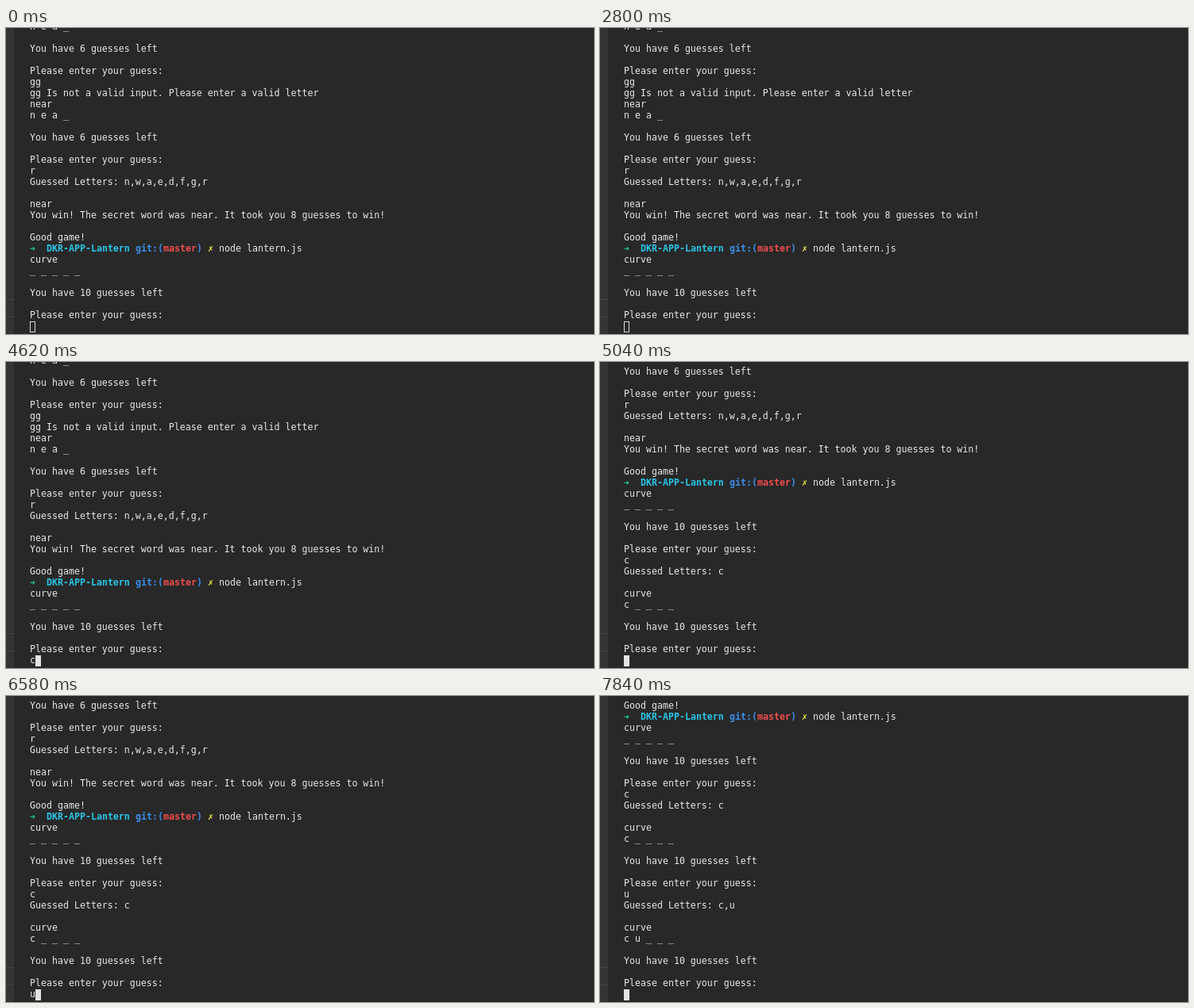
Animation of 740x386 px, one loop 8 s. Source, as an HTML page with a canvas:

```html
<!DOCTYPE html>
<html lang="en">
<head>
<meta charset="utf-8">
<title>Word guessing game in a terminal</title>
<style>
  html, body { margin: 0; width: 100%; height: 100%; overflow: hidden; background: #282828; }
  canvas { display: block; }
</style>
</head>
<body>
<canvas id="stage" width="740" height="386"></canvas>
<script>
const ctx = document.getElementById('stage').getContext('2d');

const LOOP = 8000;
const LEFT = 30, CELL = 7, LINE = 14, LAST_BASELINE = 380;
const FONT = '11.627px "DejaVu Sans Mono", monospace';
const TEXT = '#e8e8e8';

// Prompt pieces: column, text, colour, bold
const PROMPT = [
  [0, '➜', '#23d18b', true],
  [3, 'DKR-APP-Lantern', '#29c4e6', true],
  [19, 'git:(', '#3b8eea', true],
  [24, 'master', '#f14c4c', true],
  [30, ')', '#3b8eea', true],
  [32, '✗', '#f0f043', true],
  [34, 'node lantern.js', TEXT, false]
];

const ask = (left, word) => [word, '', `You have ${left} guesses left`, '', 'Please enter your guess:'];
const answer = (letter, guessed) => [letter, `Guessed Letters: ${guessed}`, '', 'curve'];

const start = [
  ...ask(6, 'n e a _'),
  'gg', 'gg Is not a valid input. Please enter a valid letter', 'near',
  ...ask(6, 'n e a _'),
  'r', 'Guessed Letters: n,w,a,e,d,f,g,r', '',
  'near', 'You win! The secret word was near. It took you 8 guesses to win!', '',
  'Good game!', PROMPT, 'curve',
  ...ask(10, '_ _ _ _ _')
];
const afterC = [...start, ...answer('c', 'c'), ...ask(10, 'c _ _ _ _')];
const afterU = [...afterC, ...answer('u', 'c,u'), ...ask(10, 'c u _ _ _')];

// Each step holds until the next one begins
const steps = [
  { at: 0, log: start, input: '' },
  { at: 3430, log: start, input: '', focus: true },
  { at: 4550, log: start, input: 'c', focus: true },
  { at: 5040, log: afterC, input: '', focus: true },
  { at: 6300, log: afterC, input: 'u', focus: true },
  { at: 6650, log: afterU, input: '', focus: true }
];

function write(text, column, baseline, color = TEXT, bold = false) {
  ctx.font = (bold ? 'bold ' : '') + FONT;
  ctx.fillStyle = color;
  ctx.fillText(text, LEFT + column * CELL, baseline);
}

function rect(x, y, w, h, color) {
  ctx.fillStyle = color;
  ctx.fillRect(x, y, w, h);
}

function drawWindow() {
  rect(0, 0, 740, 386, '#282828');
  rect(0, 0, 10, 386, '#343434');
  rect(0, 342, 10, 1, '#464646');
  rect(0, 364, 10, 1, '#464646');
}

function drawCursor(column, focus) {
  const x = LEFT + column * CELL;
  if (focus) {
    rect(x, 370, CELL, LINE, '#e4e4e4');
  } else {
    ctx.strokeStyle = '#d8d8d8';
    ctx.lineWidth = 1;
    ctx.strokeRect(x + 0.5, 370.5, CELL - 1, LINE - 1);
  }
}

function draw(time) {
  const { log, input, focus } = steps.findLast(step => step.at <= time);
  drawWindow();
  [...log, input].slice(-28).forEach((line, i) => {
    const baseline = LAST_BASELINE - (27 - i) * LINE;
    if (line === PROMPT) {
      for (const [column, text, color, bold] of PROMPT) write(text, column, baseline, color, bold);
    } else {
      write(line, 0, baseline);
    }
  });
  drawCursor(input.length, focus);
}

function tick() {
  draw(performance.now() % LOOP);
  requestAnimationFrame(tick);
}
tick();
</script>
</body>
</html>
```
